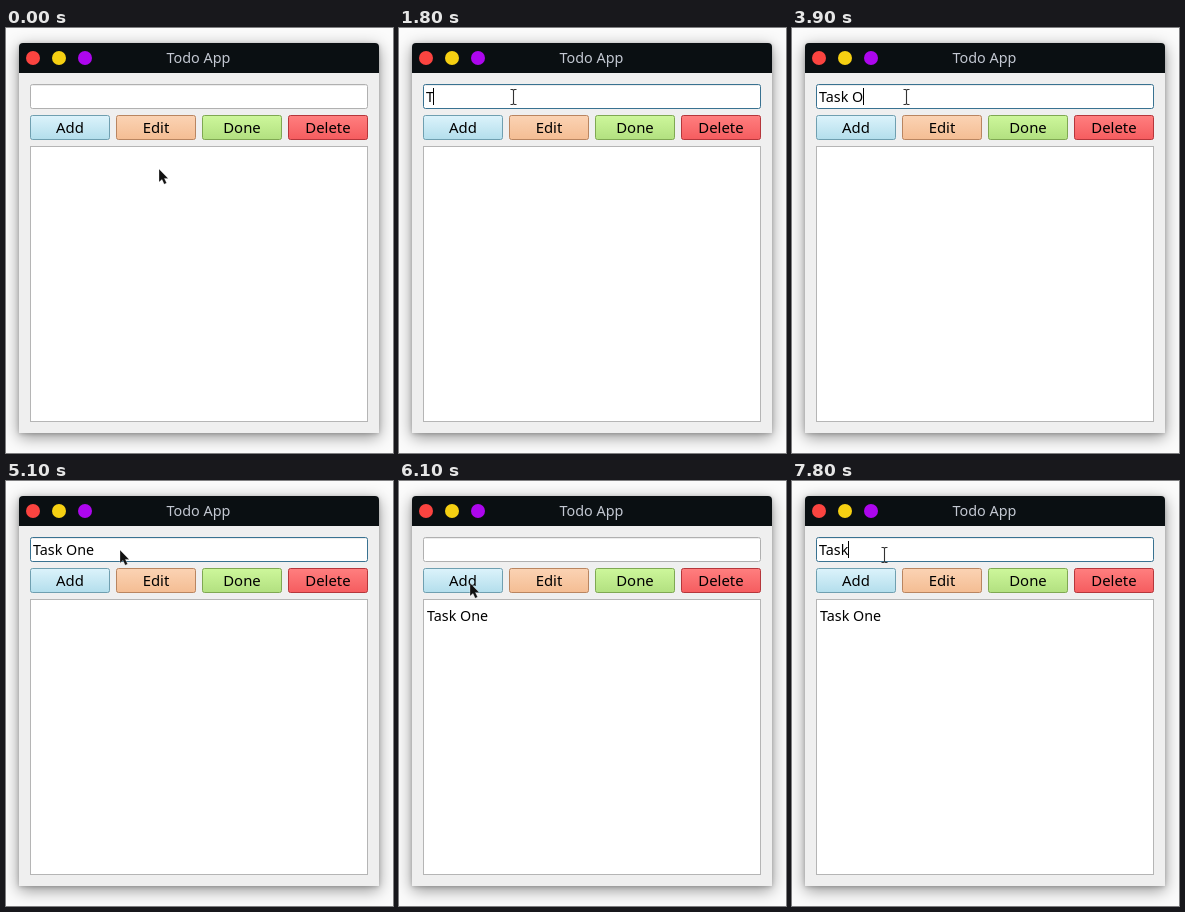
These frames come from a looping animation (387 px wide and 425 px high, 8 s). An HTML page:

```html
<!DOCTYPE html>
<html lang="en">
<head>
<meta charset="utf-8">
<title>Todo App</title>
<style>
  html, body { margin: 0; width: 100%; height: 100%; overflow: hidden; background: #fbfbfb; }
  #stage { position: relative; width: 387px; height: 425px; overflow: hidden; }
  #window {
    position: absolute; left: 13px; top: 15px; width: 360px; height: 390px;
    border-radius: 4px 4px 0 0; background: #efefef;
    box-shadow: 0 4px 16px rgba(0, 0, 0, .42), 0 1px 4px rgba(0, 0, 0, .2);
  }
  svg { position: absolute; left: 0; top: 0; }
  text { font-family: "Noto Sans", "Open Sans", sans-serif; font-size: 14.3px; white-space: pre; }
  .label { font-size: 14.9px; text-anchor: middle; }
  .title { font-size: 14.4px; text-anchor: middle; fill: #c3c8d2; }
</style>
</head>
<body>
<div id="stage">
  <div id="window"></div>
  <svg width="387" height="425" viewBox="0 0 387 425">
    <defs id="defs"></defs>
    <path d="M13 45V19a4 4 0 0 1 4-4H369a4 4 0 0 1 4 4V45z" fill="#0a0f12"/>
    <circle cx="27" cy="30" r="7" fill="#fb4440"/>
    <circle cx="53" cy="30" r="7" fill="#f6d012"/>
    <circle cx="79" cy="30" r="7" fill="#ad06ee"/>
    <text class="title" x="192.5" y="35">Todo App</text>

    <rect id="field" x="24.5" y="56.5" width="337" height="24" rx="2" fill="#fff"/>
    <path d="M26 57.5H360" stroke="#ededed"/>
    <text id="entry" x="27" y="74" xml:space="preserve"></text>
    <rect id="caret" y="60" width="1" height="17"/>

    <g id="buttons"></g>

    <rect x="24.5" y="118.5" width="337" height="275" fill="#fff" stroke="#b5b5b5"/>
    <text id="item" x="28" y="140">Task One</text>

    <g id="pointer">
      <path id="arrow" d="M0 0V13L3 10.4 5.2 15.2 7.6 14.1 5.4 9.4H9.2z" fill="#111" stroke="#fff" stroke-opacity=".45" stroke-width=".6"/>
      <path id="beam" d="M-2.5-7.5H-.5L.5-6.8 1.5-7.5H3.5M.5-6.8V6.8M-2.5 7.5H-.5L.5 6.8 1.5 7.5H3.5" fill="none" stroke="#333" stroke-width="1.1"/>
    </g>
  </svg>
</div>
<script>
const LOOP = 8000;
const byId = id => document.getElementById(id);

const buttons = [
  ["Add", "#dcf3fb", "#b3deec", "#6f9fb0"],
  ["Edit", "#fbd3b4", "#f4bd93", "#b98560"],
  ["Done", "#cdf79b", "#b2e080", "#7fa852"],
  ["Delete", "#ff7f7f", "#f55c5f", "#b5363b"]
];
buttons.forEach(([name, top, bottom, edge], i) => {
  const x = 24 + 86 * i;
  byId("defs").innerHTML +=
    `<linearGradient id="fill${name}" x2="0" y2="1"><stop stop-color="${top}"/><stop offset="1" stop-color="${bottom}"/></linearGradient>`;
  byId("buttons").innerHTML +=
    `<rect id="button${name}" x="${x + .5}" y="87.5" width="79" height="24" rx="2" fill="url(#fill${name})" stroke="${edge}"/>
     <text class="label" x="${x + 40}" y="105">${name}</text>`;
});

const start = { x: 153, y: 141, beam: false, text: "", focus: false, caret: false, pressed: false, added: false };
const move = (time, x, y, beam = false) => [time, { x, y, beam }];
const type = (time, text) => [time, { text, caret: true }];
const focus = { focus: true, caret: true };

const events = [
  move(700, 168, 137), move(800, 181, 122), move(900, 170, 96),
  move(1000, 136, 76, true), move(1100, 114, 69, true),
  [1300, focus],
  type(1800, "T"), type(2200, "Tas"),
  type(2500, "Task"), type(2600, "Task "), type(2700, "Task O"), type(2800, "Task On"),
  type(3100, "Task Onw"), [3700, { caret: false }],
  type(3900, "Task O"), type(4100, "Task On"), type(4200, "Task One"),
  [4900, { caret: false }],
  [5100, { beam: false }],
  move(5300, 88, 92),
  [5400, { x: 69, y: 105, pressed: true, focus: false }],
  [5500, { text: "", added: true }],
  [5600, { pressed: false }],
  move(6100, 71, 102), move(6200, 76, 94), move(6300, 83, 85),
  move(6400, 89, 77, true), move(6500, 92, 74, true),
  [6600, focus],
  type(7200, "T"), type(7500, "Ta"), type(7600, "Tas"), type(7800, "Task")
];

const entry = byId("entry");
const show = (id, on) => byId(id).setAttribute("visibility", on ? "visible" : "hidden");

function draw() {
  const time = performance.now() % LOOP;
  const state = Object.assign({}, start, ...events.filter(e => e[0] <= time).map(e => e[1]));

  if (entry.textContent !== state.text) entry.textContent = state.text;
  const width = state.text ? entry.getComputedTextLength() : 0;
  byId("caret").setAttribute("x", Math.floor(27 + width));
  show("caret", state.focus && state.caret);
  byId("field").setAttribute("stroke", state.focus ? "#397291" : "#b0b0b0");
  byId("buttonAdd").setAttribute("fill", state.pressed ? "#a5cfdd" : "url(#fillAdd)");
  show("item", state.added);
  byId("pointer").setAttribute("transform", `translate(${state.x} ${state.y})`);
  show("arrow", !state.beam);
  show("beam", state.beam);
  requestAnimationFrame(draw);
}
draw();
</script>
</body>
</html>
```
